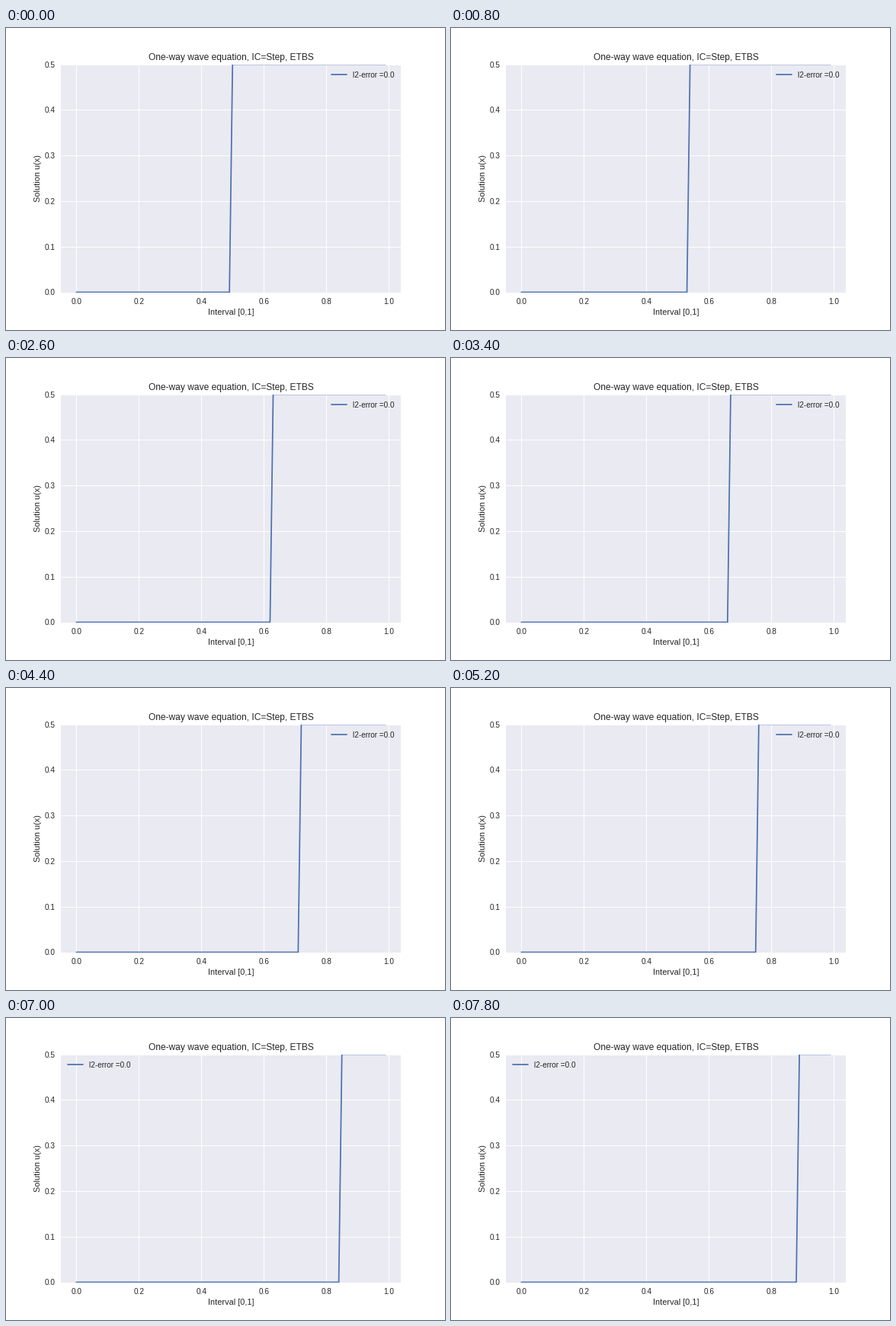
A matplotlib script that plays this animation: 576 by 396 pixels, repeating every 8000 ms.

```python
import numpy as np
import matplotlib.pyplot as plt
from matplotlib.animation import FuncAnimation

FRAMES, INTERVAL = 40, 200
CELLS = 100
START = 50          # first cell of the raised half at t = 0
INK = "0.15"

plt.rcParams.update({
    "font.family": "Liberation Sans",
    "text.color": INK,
    "axes.labelcolor": INK,
    "axes.facecolor": "#EAEAF2",
    "axes.linewidth": 0,
    "axes.axisbelow": True,
    "axes.grid": True,
    "axes.titlesize": 12,
    "axes.labelsize": 11,
    "grid.color": "white",
    "grid.linestyle": "-",
    "grid.linewidth": 1,
    "legend.fontsize": 10,
    "legend.frameon": False,
    "lines.linewidth": 1.75,
    "lines.solid_capstyle": "round",
})
for axis in ("xtick", "ytick"):
    plt.rcParams.update({
        f"{axis}.color": INK,
        f"{axis}.labelsize": 10,
        f"{axis}.major.size": 0,
        f"{axis}.major.pad": 7,
    })

fig, ax = plt.subplots(figsize=(8, 5.5), dpi=72, facecolor="white")
fig.subplots_adjust(left=0.125, right=0.9, bottom=0.125, top=0.88)

cells = np.arange(CELLS)
x = cells / CELLS
margin = 0.05 * x[-1]

line, = ax.plot(x, np.zeros(CELLS), color="#4C72B0", label="l2-error =0.0")
ax.set_xlim(-margin, x[-1] + margin)
ax.set_ylim(0, 0.5)
ax.set_xticks(np.arange(6) / 5)
ax.set_yticks(np.arange(6) / 10)
ax.set_title("One-way wave equation, IC=Step, ETBS")
ax.set_xlabel("Interval [0,1]")
ax.set_ylabel("Solution u(x)")
legend = ax.legend(loc="upper right")


def update(step):
    """Shift the step one cell per frame; the legend makes way for it."""
    front = START + step
    line.set_ydata(np.where(cells >= front, 0.5, 0.0))
    legend.set_loc("upper left" if front > 80 else "upper right")
    return line, legend


anim = FuncAnimation(fig, update, frames=FRAMES, interval=INTERVAL,
                     init_func=lambda: update(0), repeat=True, repeat_delay=0)
plt.show()
```
